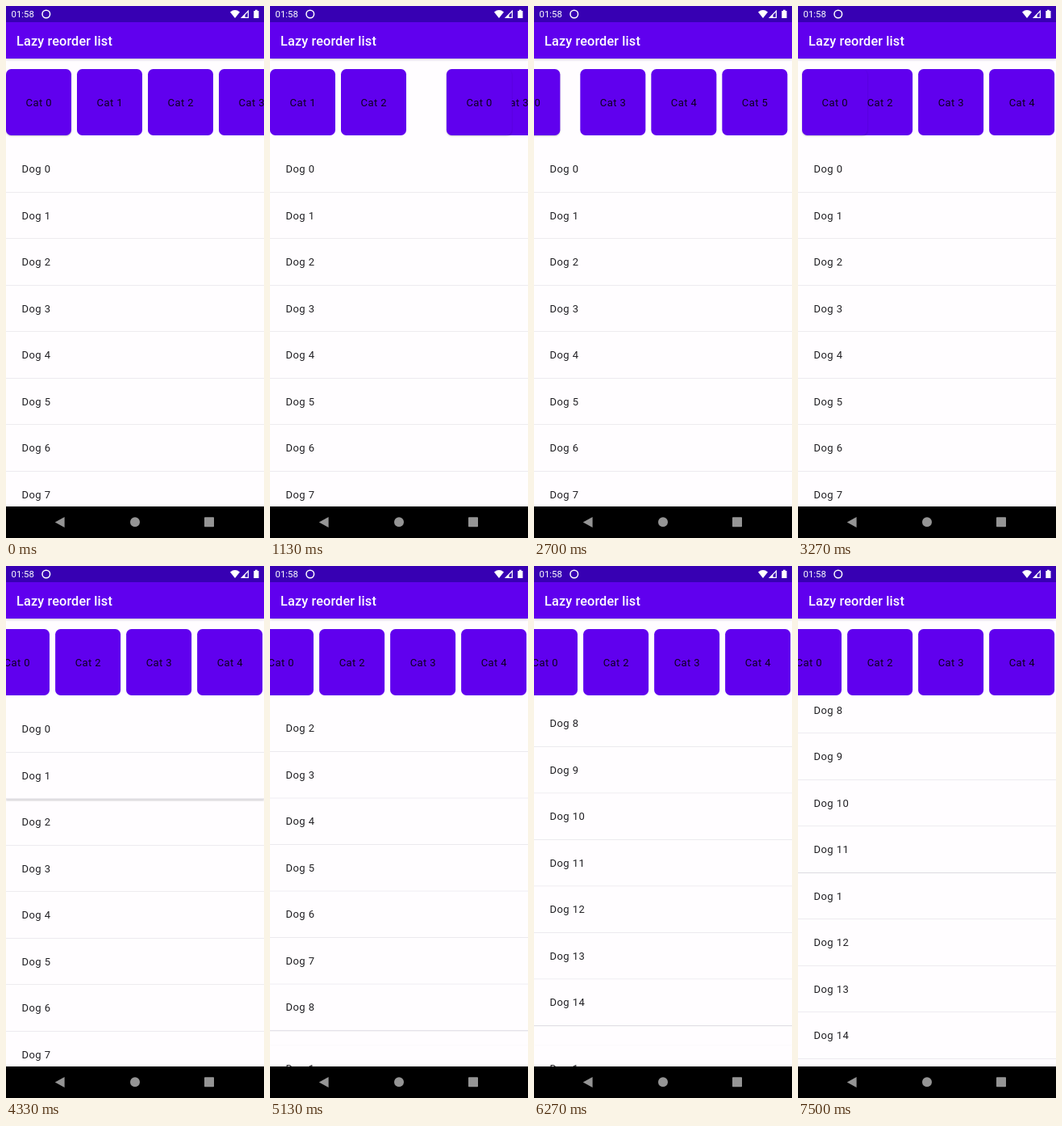
Write an HTML page that moves like this. It is 320 px wide and 658 px high and loops after 7530 ms.

```html
<!DOCTYPE html>
<html lang="en">
<head>
<meta charset="utf-8">
<title>Lazy reorder list</title>
<style>
  html, body { margin: 0; width: 100%; height: 100%; overflow: hidden; background: #fffdff; }
  #phone {
    --dp: .8148px;
    position: relative; width: 320px; height: 658px; overflow: hidden;
    background: #fffdff; color: #212024;
    font: calc(16 * var(--dp)) Roboto, sans-serif; letter-spacing: calc(.5 * var(--dp));
    white-space: nowrap;
  }
  #phone > * { position: absolute; left: 0; width: 320px; }
  .status { top: 0; height: 20px; background: #3700b3; z-index: 3; }
  .clock {
    position: absolute; left: 6.5px; color: #fff;
    font-size: calc(14 * var(--dp)); line-height: 20px; letter-spacing: 0;
  }
  .bar {
    top: 20px; height: 45px; z-index: 2; background: #6000ee; color: #fff;
    font-size: calc(20 * var(--dp)); font-weight: 500; line-height: 47px;
    letter-spacing: calc(.15 * var(--dp)); text-indent: calc(16 * var(--dp));
    box-shadow: 0 1px 3px rgba(0, 0, 0, .22);
  }
  #cats { top: 65px; height: 108px; overflow: hidden; }
  #dogs { top: 173px; height: 446px; overflow: hidden; }
  #cats div, #dogs div { position: absolute; left: 0; box-sizing: border-box; }
  #cats div {
    top: 13.2px; width: calc(100 * var(--dp)); height: calc(100 * var(--dp));
    border-radius: calc(8 * var(--dp)); background: #6000ee; color: rgba(0, 0, 0, .87);
    line-height: 84px; text-align: center;
  }
  #dogs div {
    top: 0; width: 320px; height: 57.5px; padding-left: calc(24 * var(--dp));
    background: #fffdff; border-bottom: 1px solid #dbdae0; line-height: 57.5px;
  }
  #phone .lifted { z-index: 1; box-shadow: 0 1px 2px rgba(0, 0, 0, .2); }
  .nav { top: 619px; height: 39px; background: #000; }
  svg { display: block; }
</style>
</head>
<body>
<div id="phone">
  <div class="status">
    <span class="clock">01:58</span>
    <svg width="320" height="20" fill="#fff">
      <circle cx="49.8" cy="10" r="4.8" fill="none" stroke="#fff" stroke-width="1.5"/>
      <path d="M278 7.4Q284 2.6 290 7.4L284 15Z"/>
      <path d="M292.4 14.3L300.4 6.3V14.3Z" fill="none" stroke="#fff" stroke-width="1.2"/>
      <path d="M291.5 15L296.5 10V15Z"/>
      <path d="M307.3 6H309V4.8H311.8V6H313.5V15H307.3Z"/>
    </svg>
  </div>
  <div class="bar">Lazy reorder list</div>
  <div id="cats"></div>
  <div id="dogs"></div>
  <svg class="nav" width="320" height="39" fill="#959595">
    <path d="M60.8 19.5L72.6 13V26Z"/>
    <circle cx="160" cy="19.3" r="6"/>
    <rect x="246" y="13.3" width="12" height="12" rx=".8"/>
  </svg>
</div>
<script>
const LOOP = 7530;
const SCROLL_SPEED = .308; // px per ms while an item is held past an edge

const clamp = v => Math.min(1, Math.max(0, v));
const ease = s => (1 - Math.cos(Math.PI * s)) / 2;

// Finger: sum of eased strokes. Scroll: steady speed while it runs.
const dragAt = (strokes, t) => strokes.reduce(
  (sum, { from, to, by }) => sum + by * ease(clamp((t - from) / (to - from))), 0);
const scrollAt = (runs, t) => runs.reduce(
  (sum, { from, to, way }) => sum + way * SCROLL_SPEED * (to - from) * clamp((t - from) / (to - from)), 0);

// A list whose dragged item makes the items it passes move up one slot.
function list({ id, label, count, dragged, pitch, axis, lift, drop, strokes, runs }) {
  const root = document.getElementById(id);
  const items = Array.from({ length: count }, (_, k) => {
    const item = document.createElement("div");
    item.textContent = `${label} ${k}`;
    return root.appendChild(item);
  });
  return t => {
    const offset = scrollAt(runs, t);
    const held = dragged + (dragAt(strokes, t) + offset) / pitch;
    items.forEach((item, k) => {
      let slot = k;
      if (k === dragged) slot = held;
      else if (k > dragged) slot -= clamp((held - k + .5) * 4);
      item.style.transform = `translate${axis}(${(slot * pitch - offset).toFixed(2)}px)`;
    });
    items[dragged].classList.toggle("lifted", t >= lift && t < drop);
  };
}

const lists = [
  list({
    id: "cats", label: "Cat", count: 10, dragged: 0, pitch: 88, axis: "X",
    lift: 0, drop: 3370,
    strokes: [
      { from: 180, to: 1425, by: 252 },
      { from: 1980, to: 2820, by: -316 },
      { from: 2900, to: 3130, by: 74 },
      { from: 3240, to: 3370, by: -37 }
    ],
    runs: [{ from: 1233, to: 2000, way: 1 }, { from: 2605, to: 2999, way: -1 }]
  }),
  list({
    id: "dogs", label: "Dog", count: 20, dragged: 1, pitch: 57.5, axis: "Y",
    lift: 4330, drop: 6770,
    strokes: [{ from: 4570, to: 5040, by: 362.5 }, { from: 6300, to: 6770, by: -213.5 }],
    runs: [{ from: 4942, to: 6325, way: 1 }]
  })
];

function frame(now) {
  lists.forEach(draw => draw(now % LOOP));
  requestAnimationFrame(frame);
}
frame(0);
</script>
</body>
</html>
```
